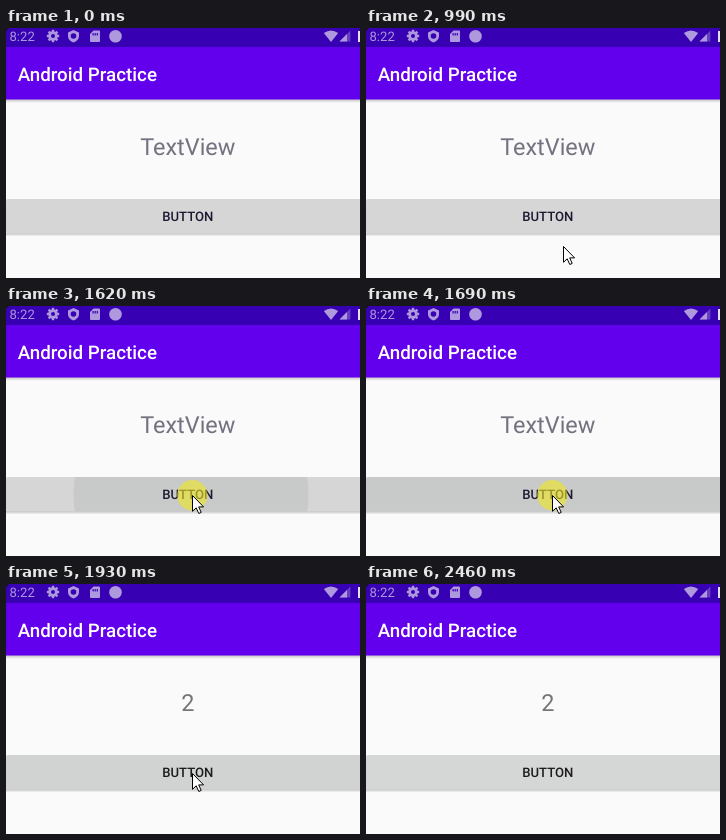
Recreate the animation shown at these times as an HTML page. Size 354 by 250 pixels, loop 2920 ms.

```html
<!DOCTYPE html>
<html lang="en">
<head>
<meta charset="utf-8">
<title>Button demo</title>
<style>
  html, body { margin: 0; width: 100%; height: 100%; overflow: hidden; background: #fafafa; }
  svg { display: block; width: 354px; height: 250px; }
  text { font-family: Roboto, sans-serif; text-rendering: geometricPrecision; }
  .medium { font-weight: 500; }
  .icons { fill: #ae98de; }
</style>
</head>
<body>
<svg viewBox="0 0 354 250">
  <defs>
    <linearGradient id="shade" x2="0" y2="1">
      <stop stop-color="#000" stop-opacity=".24"/>
      <stop offset="1" stop-color="#000" stop-opacity="0"/>
    </linearGradient>
    <clipPath id="buttonShape"><rect y="171" width="358" height="34.5" rx="2"/></clipPath>
  </defs>

  <rect width="354" height="250" fill="#fafafa"/>
  <rect y="71" width="354" height="4" fill="url(#shade)"/>
  <rect y="19" width="354" height="52.5" fill="#6200ee"/>
  <rect width="354" height="19" fill="#3700b3"/>
  <path d="M0 0H3L0 3Z" fill="#161020"/>

  <g class="icons">
    <text x="3.5" y="13" font-size="13.1">8:22</text>
    <g transform="translate(47 8)">
      <circle r="3.4" fill="none" stroke="#ae98de" stroke-width="2.8"/>
      <g id="teeth"></g>
    </g>
    <path fill-rule="evenodd" d="M67.5 2L73 4.4V8C73 11 70.6 13.6 67.5 14.4C64.4 13.6 62 11 62 8V4.4Z
      M67.5 5.2A2.8 2.8 0 1 0 67.5 10.8A2.8 2.8 0 1 0 67.5 5.2Z"/>
    <path fill-rule="evenodd" d="M87.5 2.5H93Q94 2.5 94 3.5V13Q94 14 93 14H85Q84 14 84 13V6Z
      M86.5 5V7.5H87.7V5ZM88.6 5V7.5H89.8V5ZM90.7 5V7.5H91.9V5Z"/>
    <circle cx="109.5" cy="8.3" r="6.3"/>
    <path d="M317.8 5Q325 -.2 332.2 5L325 14Z"/>
    <path d="M344.4 2.5V13.5H333.5Z" fill-opacity=".4"/>
    <path d="M341 6V13.5H333.5Z"/>
    <rect x="352" y="3" width="2" height="11" fill="#e4dcf5"/>
  </g>

  <text class="medium" x="11.7" y="53" font-size="18.75" fill="#fff">Android Practice</text>
  <text id="label" x="181.8" y="127.3" font-size="23.44" text-anchor="middle"></text>

  <rect y="205" width="354" height="3.5" fill="url(#shade)"/>
  <g clip-path="url(#buttonShape)">
    <rect id="face" y="171" width="358" height="35"/>
    <circle id="ripple" cx="185" cy="188.5" fill="#c7cac8"/>
  </g>
  <text id="caption" class="medium" x="181.8" y="193.2" font-size="13.12" text-anchor="middle">BUTTON</text>
  <circle id="halo" cx="186.3" cy="189.3" r="15.2" fill="#eee620" fill-opacity=".6"/>
  <path id="cursor" d="M.5 .5V16.3L4.2 12.8L6.8 18.5L9.2 17.4L6.7 11.9H11.6Z" fill="#fff" stroke="#000"/>
</svg>
<script>
const LOOP = 2920;
const $ = id => document.getElementById(id);

$('teeth').innerHTML = Array.from({ length: 8 }, (_, i) =>
  `<rect x="-1.2" y="-6.2" width="2.4" height="2.4" transform="rotate(${i * 45})"/>`).join('');

// Pointer positions: start time, x, y; no position hides it.
const pointer = [
  [0], [680, 235, 244], [740, 225, 237], [820, 214, 231], [900, 204, 224],
  [990, 197, 218], [1050, 193, 209], [1130, 189, 199],
  [1220, 188, 196], [1290, 187, 192], [1360, 186, 189],
  [2240, 201, 200], [2310, 233, 220], [2390, 274, 238], [2460]
];

// Press states: start time, button colour, ripple radius, halo visible.
const press = [
  [0, '#d6d6d6', 0, false],
  [1530, '#d6d6d6', 0, true],
  [1620, '#d6d6d6', 117.5, true],
  [1690, '#d6d6d6', 190, true],
  [1770, '#babdbb', 0, false],
  [1930, '#d1d3d2', 0, false],
  [2240, '#d5d7d6', 0, false]
];

const stepAt = (steps, time) => steps.findLast(([start]) => start <= time);

function draw(time) {
  const [, x, y] = stepAt(pointer, time);
  const [, color, radius, pressed] = stepAt(press, time);
  const clicked = time >= 1770;

  $('cursor').style.display = x === undefined ? 'none' : '';
  if (x !== undefined) $('cursor').setAttribute('transform', `translate(${x} ${y})`);
  $('face').setAttribute('fill', color);
  $('ripple').setAttribute('r', radius);
  $('halo').style.display = pressed ? '' : 'none';
  $('label').textContent = clicked ? '2' : 'TextView';
  $('label').setAttribute('fill', clicked ? '#757575' : '#747180');
  $('caption').setAttribute('fill', clicked ? '#1c1c1c' : '#1c1930');
}

const begin = performance.now();
function tick() {
  draw((performance.now() - begin) % LOOP);
  requestAnimationFrame(tick);
}
tick();
</script>
</body>
</html>
```
